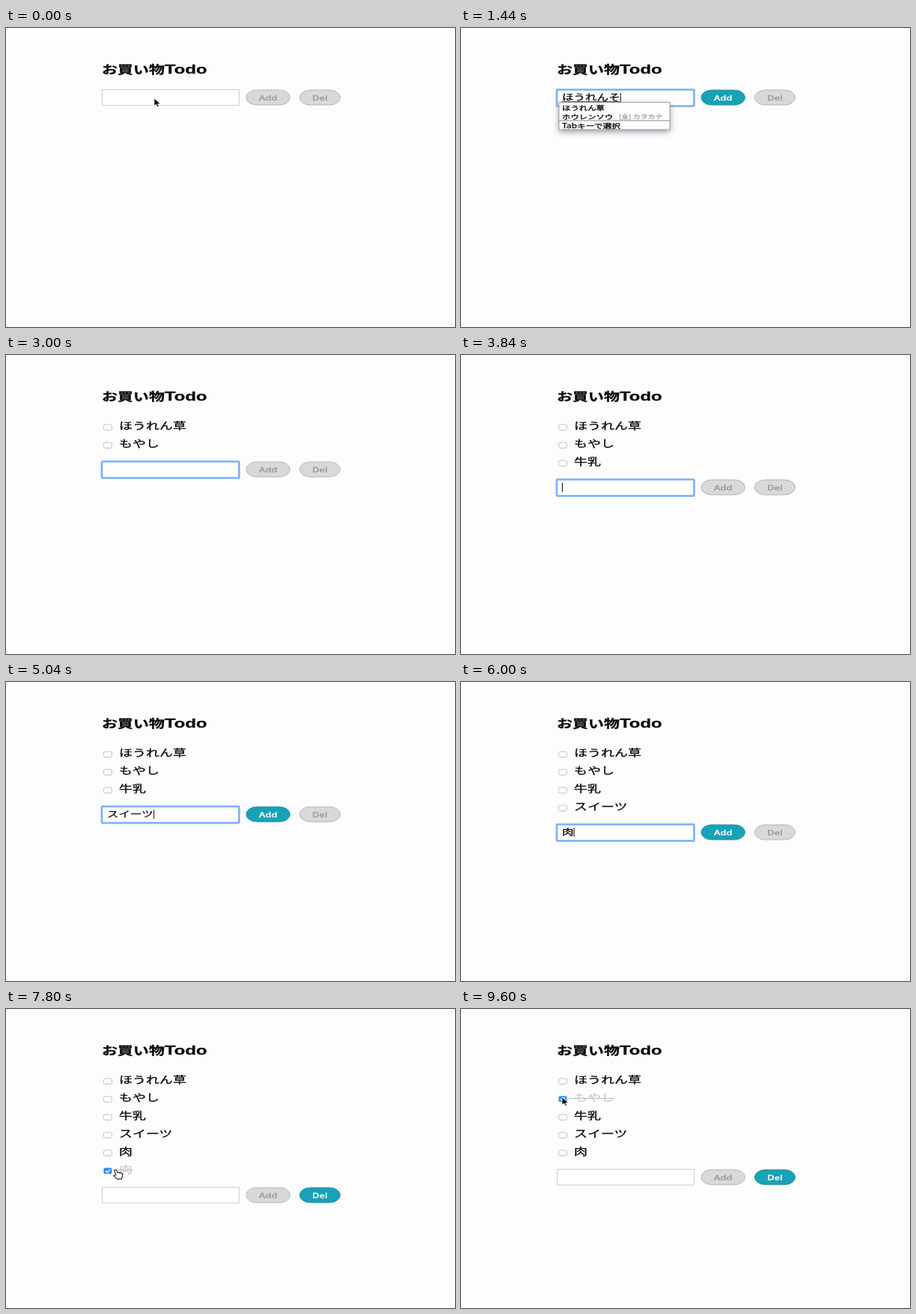
Recreate the animation shown at these times as an HTML page. Size 600 px wide and 400 px high, loop 9720 ms.

```html
<!DOCTYPE html>
<html lang="ja">
<head>
<meta charset="utf-8">
<title>お買い物Todo</title>
<style>
  html, body { margin: 0; width: 100%; height: 100%; overflow: hidden; background: #fdfdfd; }
  svg { display: block; width: 600px; height: 400px; }
  text { font-family: "Noto Sans CJK JP", "Noto Sans CJK", "Noto Sans", sans-serif; white-space: pre; }
  .latin { font-family: "Liberation Sans", sans-serif; }
  .button { font-family: "Open Sans", "Noto Sans", sans-serif; font-weight: 600; text-anchor: middle; }
</style>
</head>
<body>
<svg id="stage" viewBox="0 0 600 400">
  <defs>
    <filter id="shadow" x="-20%" y="-40%" width="140%" height="190%"><feGaussianBlur stdDeviation="4"/></filter>
    <filter id="glow" x="-5%" y="-40%" width="110%" height="180%"><feGaussianBlur stdDeviation=".4"/></filter>
  </defs>
  <g id="scene"></g>
</svg>
<script>
const LOOP = 9720, TICK = 60;
const STRETCH = 1.4; // the whole page is shown wider than tall
const INK = '#080808', FAINT = '#cdcdcd';

// start and pace of typing, moment of conversion and of adding, in ms
const entries = [
  { start: 600, pace: 120, convert: 1680, add: 1860, word: 'ほうれん草', kata: 'ホウレンソウ',
    strokes: 'ｈ ほ ほう ほうｒ ほうれ ほうれん ほうれんｓ ほうれんそ ほうれんそう', more: ['方'], moreUntil: 960 },
  { start: 2160, pace: 90, convert: 2700, add: 2940, word: 'もやし', kata: 'モヤシ',
    strokes: 'ｍ も もｙ もや もやｓ もやし', more: ['燃やし', 'もや', '催し'], moreUntil: 2520 },
  { start: 3120, pace: 60, convert: 3480, add: 3720, word: '牛乳', kata: 'ギュウニュウ',
    strokes: 'ｇ ぎゅ ぎゅう ぎゅうｎ ぎゅうにゅ ぎゅうにゅう', more: ['ぎゅうにゅう'], moreUntil: 3480 },
  { start: 4260, pace: 120, convert: 4980, add: 5340, word: 'スイーツ', kata: 'スイーツ',
    strokes: 'ｓ す すい すいー すいーｔ すいーつ', more: [], moreUntil: 0 },
  { start: 5520, pace: 90, convert: 5880, add: 6180, word: '肉', kata: 'ニク',
    strokes: 'ｎ に にｋ にく', more: ['肉類'], moreUntil: 5880 },
  { start: 6420, pace: 120, convert: 6900, add: 7080, word: '肉', kata: 'ニク',
    strokes: 'ｎ に にｋ にく', more: ['肉類'], moreUntil: 6900 }
];
const FOCUS = 120, POINTER_HIDE = 480, POINTER_SHOW = 7380;
const CHECK_LAST = 7680, DELETE = 8280, CHECK_SECOND = 9480;

// pointer stops: time, x, y
const stops = [
  [0, 198, 94], [7380, 198, 130], [7620, 135, 213], [7740, 135, 213], [7800, 146, 215],
  [8160, 418, 250], [8340, 418, 250], [8460, 420, 255], [9360, 150, 124], [9480, 135, 118], [9720, 135, 118]
];

// a hairline outline gives the text its slightly heavy weight
const text = (x, y, size, str, fill = INK, extra = '') =>
  `<text transform="translate(${x} ${y}) scale(${STRETCH} 1)" font-size="${size}" fill="${fill}" stroke="${fill}" stroke-width=".25" ${extra}>${str}</text>`;
const rect = (x, y, w, h, fill, extra = '') =>
  `<rect x="${x}" y="${y}" width="${w}" height="${h}" fill="${fill}" ${extra}/>`;
const line = (x1, x2, y, color) => `<path d="M${x1} ${y}H${x2}" stroke="${color}"/>`;

function button(label, x, w, mid, on) {
  const box = rect(x + .5, mid - 10, w - 1, 20, on ? '#17a2b8' : '#d9d9d9',
    `rx="14" ry="10" stroke="${on ? '#2c8f9e' : '#b4b4bc'}"`);
  return box + text(x + w / 2, mid + 3.6, 9.2, label, on ? '#fff' : '#9d9d9d', 'class="button"');
}

function item(word, row, checked) {
  const y = 94 + 24 * row, right = 151 + word.length * 12.85 * STRETCH;
  const box = checked
    ? rect(130.5, y - 1.5, 11, 8, '#2a8ff0', 'rx="2"') +
      `<path d="M133 ${y + 2.5}l2.2 2 4-4" fill="none" stroke="#fff" stroke-width="1.4"/>`
    : rect(130.5, y - 1, 11, 7.5, '#fff', 'rx="2.5" ry="2" stroke="#c2c2c2"');
  return box + text(151, y + 4.8, 12.85, word, checked ? FAINT : INK) +
    (checked ? line(144, right, y + 1.5, '#bdbdbd') : '');
}

function popup(entry, t, mid) {
  const rows = [entry.word, ...(t < entry.moreUntil ? entry.more : []), entry.kata];
  const top = mid + 6.5, split = top + 1 + rows.length * 11.7, height = split + 12 - top;
  return rect(131, top + 3, 148, height, '#77778a', 'filter="url(#shadow)" opacity=".75"') +
    rect(131, top, 148, height, '#fdfdfd', 'stroke="#a0a0a0"') +
    rows.map((row, i) => text(135, top + 10.3 + i * 11.7, 8.15, row)).join('') +
    text(211, split - 3, 7.1, '[全] カタカナ', '#a0a0a0') +
    line(131, 279, split, '#8c8c8c') + text(135, split + 9.8, 8.4, 'Tabキーで選択');
}

function form(t, mid, entry, anyChecked) {
  const focused = t >= FOCUS && t < CHECK_LAST;
  const composing = entry && t < entry.convert;
  const strokes = entry ? entry.strokes.split(' ') : [];
  const draft = !entry ? '' : composing
    ? strokes[Math.min(strokes.length - 1, Math.floor((t - entry.start) / entry.pace))] : entry.word;
  const end = 135 + draft.length * 11.1 * STRETCH;
  let out = focused
    ? rect(128, mid - 10.5, 183.5, 22, '#fff', 'rx="1" stroke="#78b0fa" stroke-width="2.6" filter="url(#glow)"')
    : rect(128.5, mid - 10.5, 183, 21, '#fff', 'stroke="#cfcfcf"');
  out += text(135, mid + 4, 11.1, draft);
  if (composing) out += line(135, end, mid + 5.5, '#555');
  if (focused && (draft || t % 1000 >= 500))
    out += rect(end, mid - 6, 1, 12, INK);
  out += button('Add', 320.5, 59.5, mid, !!draft) + button('Del', 392, 55, mid, anyChecked);
  return out + (composing ? popup(entry, t, mid) : '');
}

function pointer(t) {
  if (t >= POINTER_HIDE && t < POINTER_SHOW) return '';
  const i = stops.findIndex((stop, k) => t < stops[k + 1][0]);
  const [t0, x0, y0] = stops[i], [t1, x1, y1] = stops[i + 1];
  const p = (t - t0) / (t1 - t0), ease = t < POINTER_HIDE ? 0 : p * p * (3 - 2 * p);
  const x = x0 + (x1 - x0) * ease, y = y0 + (y1 - y0) * ease;
  const hand = x > 392 || (x > 143 && x < 172 && t > CHECK_LAST);
  const shape = hand
    ? `<path d="M-1 1Q0-.8 1 .6L2.6 4.2 3 3.4 4.4 3.6 5 4.6 5.6 3.8 6.8 4.4 7.3 5.2Q8.6 5 8.2 7L7.6 10 7 12.5H2.2L-1.4 8.4Q-2 7 .2 7.4L.7 7.2Z" fill="#fff" stroke="#111" stroke-width=".9"/>`
    : '<path d="M0 0V10L2.1 8.2 3.6 11.4 5.1 10.8 3.6 7.7H6.6Z" fill="#000" stroke="#fff" stroke-width=".7"/>';
  return `<g transform="translate(${x} ${y}) scale(${hand ? 1.2 : 1.3} 1)">${shape}</g>`;
}

function draw(t) {
  let items = entries.filter(e => t >= e.add).map(e => e.word);
  if (t >= DELETE) items = items.slice(0, 5);
  const checked = t >= CHECK_SECOND ? 1 : t >= CHECK_LAST && t < DELETE ? 5 : -1;
  const entry = entries.find(e => t >= e.start && t < e.add);
  const mid = items.length ? 105 + 24 * items.length : 93;
  return text(128, 60.8, 15, 'お買い物', INK, 'font-weight="700"') +
    text(212, 60.8, 17.1, 'Todo', INK, 'font-weight="700" class="latin"') +
    items.map((word, row) => item(word, row, row === checked)).join('') +
    form(t, mid, entry, checked >= 0) + pointer(t);
}

const scene = document.getElementById('scene');
let shown = -1;
function play() {
  const t = Math.floor(performance.now() % LOOP / TICK) * TICK;
  if (t !== shown) scene.innerHTML = draw(shown = t);
  requestAnimationFrame(play);
}
play();
</script>
</body>
</html>
```
